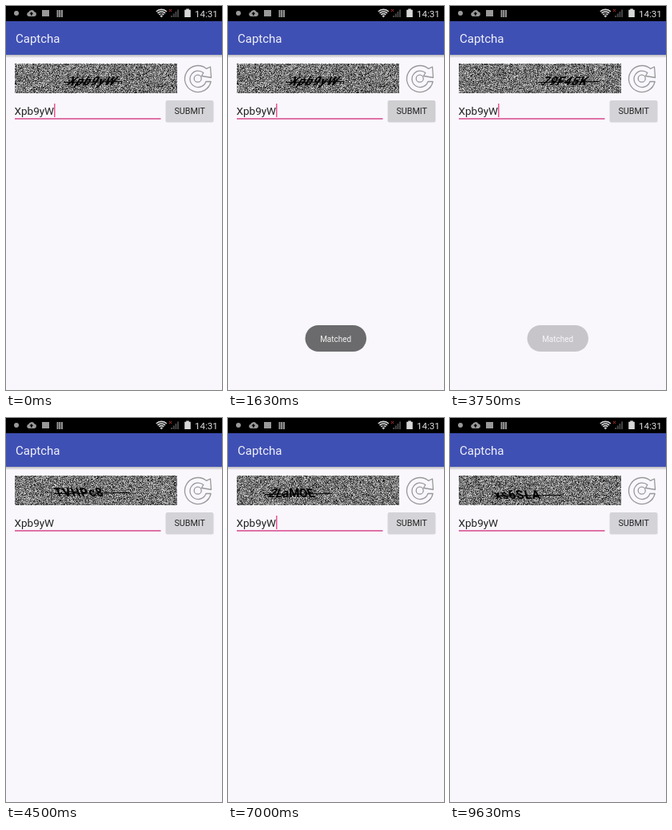
An HTML page with a canvas that plays this animation: 270 px wide and 480 px high, repeating every 9.76 s.

```html
<!DOCTYPE html>
<html lang="en">
<head>
<meta charset="utf-8">
<title>Captcha</title>
<style>
  html, body { margin: 0; width: 100%; height: 100%; overflow: hidden; background: #f9f7fc; }
  svg { position: absolute; left: 0; top: 0; }
  text { font-family: Roboto, sans-serif; }
  .captcha { position: absolute; left: 11px; top: 72px; width: 203px; height: 37px; overflow: hidden; }
  .captcha canvas { display: block; animation: strip 9760ms step-end infinite; }
  .caret { animation: blink 9760ms step-end infinite; }
  .toast { animation: toast 9760ms step-end infinite; }
  .press { animation: press 9760ms step-end infinite; }
  .activity { animation: activity 9760ms step-end infinite; }

  @keyframes strip {
    0% { transform: none; }
    33.29% { transform: translateY(-37px); }
    39.74% { transform: translateY(-74px); }
    46.1% { transform: translateY(-111px); }
    52.55% { transform: translateY(-148px); }
    58.9% { transform: translateY(-185px); }
    65.36% { transform: translateY(-222px); }
    71.71% { transform: translateY(-259px); }
    81.96%, 100% { transform: translateY(-296px); }
  }
  @keyframes blink {
    0%, 6.45%, 16.69%, 26.94%, 38.41%, 58.9%, 71.71%, 81.96%, 93.54% { opacity: 1; }
    1.33%, 11.57%, 21.82%, 33.29%, 46.1%, 65.36%, 76.84%, 88.42%, 98.66%, 100% { opacity: 0; }
  }
  @keyframes toast {
    0% { opacity: 0; }
    12.8% { opacity: .3; }
    14.13% { opacity: .65; }
    15.36% { opacity: .9; }
    16.69% { opacity: 1; }
    35.85% { opacity: .85; }
    37.18% { opacity: .6; }
    38.41% { opacity: .35; }
    39.74% { opacity: .1; }
    40.97%, 100% { opacity: 0; }
  }
  @keyframes press {
    0% { opacity: 0; }
    11.57% { opacity: .06; }
    12.8% { opacity: .12; }
    14.13% { opacity: .09; }
    15.36% { opacity: .05; }
    16.69% { opacity: .02; }
    17.92%, 100% { opacity: 0; }
  }
  @keyframes activity {
    0%, 33.29%, 71.71% { opacity: 1; }
    2.56%, 43.54%, 84.52%, 100% { opacity: 0; }
  }
</style>
</head>
<body>
<svg width="270" height="480" viewBox="0 0 270 480">
  <defs>
    <linearGradient id="shade" x2="0" y2="1">
      <stop stop-color="#000" stop-opacity=".26"/>
      <stop offset="1" stop-color="#000" stop-opacity="0"/>
    </linearGradient>
    <clipPath id="fan"><path d="M194.300 14.500l-9-10.500V0h18v4z"/></clipPath>
  </defs>

  <!-- status bar -->
  <rect width="270" height="19" fill="#000"/>
  <g fill="#999">
    <circle cx="13" cy="9" r="3"/>
    <path d="M28.500 13a2.700 2.700 0 0 1-.3-5.300 4 4 0 0 1 7.300-.4 2.900 2.900 0 0 1 .2 5.700z"/>
    <rect x="45" y="5" width="9" height="8"/>
    <path d="M63.500 5h2v9h-2zM66.200 5h2v9h-2zM68.900 5h2v9h-2z"/>
  </g>
  <path d="M31.800 7.200l2.400 2.600h-1.500v2h-1.800v-2h-1.500z" fill="#000"/>
  <g clip-path="url(#fan)" fill="none" stroke="#d8d8d8" stroke-width="1.700">
    <circle cx="194.300" cy="13.500" r="1.200"/>
    <circle cx="194.300" cy="13.500" r="3.800"/>
    <circle cx="194.300" cy="13.500" r="6.500"/>
    <circle cx="194.300" cy="13.500" r="9.200"/>
  </g>
  <path class="activity" d="M192 9h4l-2 3z" fill="#555"/>
  <path d="M206 14v-2h2v2zM208.700 14v-4.500h2V14zM211.400 14V7h2v7zM214.100 14V4.500h2V14z" fill="#444"/>
  <path d="M204 4l3 3m0-3l-3 3" stroke="#b8322d"/>
  <path d="M225.200 3.500h3.600v1.300h2V14h-7.600V4.800h2z" fill="#d8d8d8"/>
  <text x="236" y="14" font-size="11.600" fill="#dedede">14:31</text>

  <!-- app bar -->
  <rect y="19" width="270" height="42" fill="#3f50b4"/>
  <rect y="61" width="270" height="4" fill="url(#shade)"/>
  <text x="12" y="45.700" font-size="15" fill="#f0f0f8">Captcha</text>

  <!-- refresh -->
  <g fill="none" stroke="#989899" stroke-width="1.300" stroke-linejoin="round">
    <path d="M256.100 94.500A16.500 16.500 0 1 1 250.600 78.400L255.500 76 256.500 89.500 244.500 87.500 246.800 83.500A10.200 10.200 0 1 0 249.900 94.500z"/>
    <circle cx="239.700" cy="90.700" r="4.500"/>
  </g>

  <!-- input -->
  <text x="10.500" y="135.600" font-size="13.500" fill="#222">Xpb9yW</text>
  <rect class="caret" x="60" y="122" width="1.500" height="17" fill="#f0508f"/>
  <rect x="11" y="140.200" width="182.500" height="1.500" fill="#d8468c"/>

  <!-- button -->
  <rect x="199.500" y="118.500" width="60" height="27" rx="2" fill="#000" opacity=".14"/>
  <rect x="200" y="118" width="59" height="26.500" rx="1.500" fill="#d4d3d7"/>
  <rect class="press" x="200" y="118" width="59" height="26.500" rx="1.500"/>
  <text x="229.700" y="135.300" font-size="10.700" text-anchor="middle" fill="#222">SUBMIT</text>

  <!-- toast -->
  <g class="toast">
    <rect x="96.500" y="399" width="76.500" height="33" rx="16.500" fill="#6b6b6d"/>
    <text x="134.700" y="419.500" font-size="10" text-anchor="middle" fill="#f2f2f2">Matched</text>
  </g>
</svg>

<div class="captcha"><canvas></canvas></div>

<script>
  const W = 203, H = 37;
  // text, left, baseline, slant of the first and last letter, line end
  const captchas = [
    ['Xpb9yW', 64, 27, -0.7, -0.6, 134],
    ['79F45K', 102, 27, -0.6, -0.5, 176],
    ['hR4mT2', 72, 28, -0.5, 0.3, 146],
    ['TVHPc8', 52, 26, 0.4, 0.4, 144],
    ['Kd7eU3', 62, 28, 0.5, -0.3, 140],
    ['WiWON', 85, 28, -0.6, -0.6, 148],
    ['b5YnG9', 58, 27, -0.5, 0.2, 134],
    ['2LaMOE', 38, 27, -0.6, 0.4, 119],
    ['xs6SLA', 47, 29, 0.5, 0.2, 128]
  ];
  const canvas = document.querySelector('canvas');
  canvas.width = W;
  canvas.height = H * captchas.length;
  const ctx = canvas.getContext('2d');

  let seed = 20;
  const random = () => (seed = (seed * 1664525 + 1013904223) % 4294967296) / 4294967296;

  function drawNoise() {
    const image = ctx.createImageData(W, canvas.height);
    for (let i = 0; i < image.data.length; i += 4) {
      image.data.fill((random() + random()) * 118, i, i + 3);
      image.data[i + 3] = 255;
    }
    ctx.putImageData(image, 0, 0);
  }

  function drawCaptcha([text, left, baseline, firstSlant, lastSlant, lineEnd], row) {
    const top = row * H;
    let x = left;
    [...text].forEach((letter, i) => {
      const slant = firstSlant + (lastSlant - firstSlant) * i / (text.length - 1);
      ctx.setTransform(1, 0, slant, 1, x, top + baseline);
      ctx.fillText(letter, 0, 0);
      x += ctx.measureText(letter).width + 0.8;
    });
    ctx.setTransform(1, 0, 0, 1, 0, top);
    ctx.beginPath();
    ctx.moveTo(left - 3, baseline - 3.5);
    ctx.lineTo(lineEnd, baseline - 4.5);
    ctx.stroke();
  }

  drawNoise();
  ctx.font = 'bold 15px Roboto, sans-serif';
  captchas.forEach(drawCaptcha);
</script>
</body>
</html>
```
